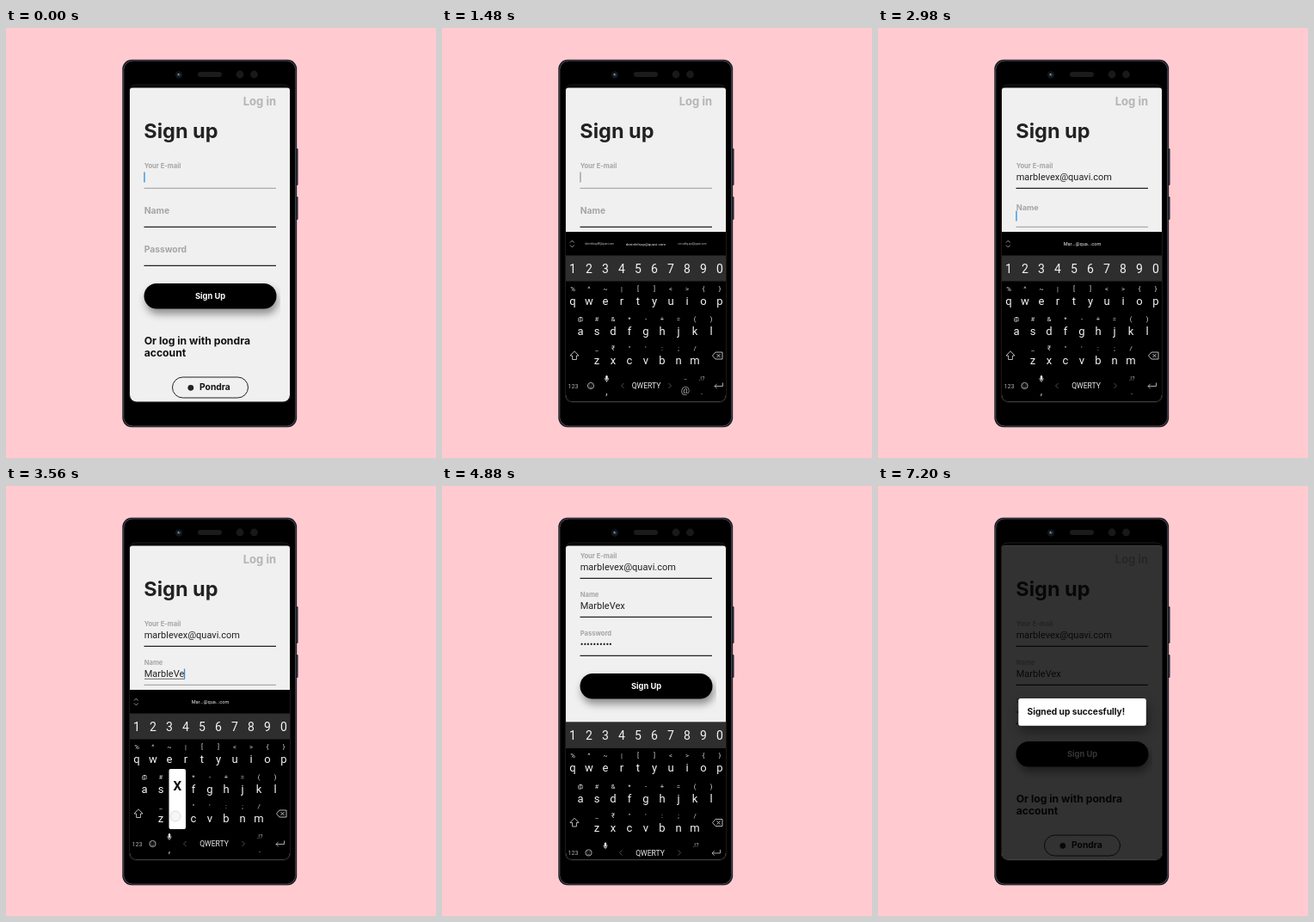
An HTML page with a canvas for the animation above (8.78 s loop, 500 px wide and 500 px high).

```html
<!DOCTYPE html>
<html lang="en">
<head>
<meta charset="utf-8">
<title>Sign up form</title>
<style>
  html, body { margin: 0; width: 100%; height: 100%; overflow: hidden; background: #ffcbd0; }
  canvas { display: block; width: 500px; height: 500px; }
</style>
</head>
<body>
<canvas id="stage"></canvas>
<script>
const LOOP = 8780;
const UI = 'Inter, sans-serif', KEY = 'Roboto, sans-serif';
const canvas = document.getElementById('stage');
const dpr = window.devicePixelRatio || 1;
canvas.width = canvas.height = 500 * dpr;
const c = canvas.getContext('2d');
c.scale(dpr, dpr);

const clamp = v => Math.min(1, Math.max(0, v));
const ease = (t, a, b) => { const p = clamp((t - a) / (b - a)); return p * p * (3 - 2 * p); };
const mix = (a, b, p) => a + (b - a) * p;

function text(str, x, y, size, color, { weight = 400, font = KEY, align = 'left' } = {}) {
  c.font = `${weight} ${size}px ${font}`;
  c.textAlign = align;
  c.fillStyle = color;
  c.fillText(str, x, y);
}
const bold = (str, x, y, size, color, align) =>
  text(str, x, y, size, color, { weight: 700, font: UI, align });
const mid = (str, x, y, size, color = '#eee') => text(str, x, y, size, color, { align: 'center' });

function rect(x, y, w, h, color) { c.fillStyle = color; c.fillRect(x, y, w, h); }
function round(x, y, w, h, r, fill, stroke) {
  c.beginPath();
  c.roundRect(x, y, w, h, r);
  if (fill) { c.fillStyle = fill; c.fill(); }
  if (stroke) { c.strokeStyle = stroke; c.lineWidth = 1; c.stroke(); }
}
function disc(x, y, r, fill, stroke) { round(x - r, y - r, 2 * r, 2 * r, r, fill, stroke); }
function path(color, width, ...points) {
  c.beginPath();
  points.forEach(([x, y], i) => i ? c.lineTo(x, y) : c.moveTo(x, y));
  c.strokeStyle = color;
  c.lineWidth = width;
  c.stroke();
}
function shadow(alpha, blur, dx, dy) {
  c.shadowColor = `rgba(0,0,0,${alpha})`;
  c.shadowBlur = blur * dpr;
  c.shadowOffsetX = dx * dpr;
  c.shadowOffsetY = dy * dpr;
}

// Each field types one character per step; focus is when it is tapped.
const FIELDS = [
  { label: 'Your E-mail', value: 'marblevex@quavi.com', focus: -1000, start: 1532, step: 72 },
  { label: 'Name', value: 'MarbleVex', focus: 2940, start: 3041, step: 63 },
  { label: 'Password', value: '0987654321', focus: 3930, start: 4060, step: 64, secret: true }
];
const COMMIT = 0.8;
const typed = (f, t) =>
  Math.max(0, Math.min(f.value.length, Math.floor((t - f.start) / f.step + 1 - COMMIT)));

const ROWS = [
  { keys: '1234567890', x: 152, y: 280 },
  { keys: 'qwertyuiop', x: 152, y: 317, alt: '%^~|[]<>{}' },
  { keys: 'asdfghjkl', x: 161, y: 352.5, alt: '@#&*-+=()' },
  { keys: 'zxcvbnm', x: 180, y: 386.5, alt: '_₹"\':;/' }
];
function keyPos(ch) {
  if (ch === '@') return [283, 422];
  if (ch === '.') return [302, 422];
  const row = ROWS.find(r => r.keys.includes(ch));
  return [row.x + 19 * row.keys.indexOf(ch), row.y];
}

function drawPhone() {
  round(336, 140, 3.6, 43, 1.2, '#2a2b38');
  round(336, 196, 3.6, 27, 1.2, '#2a2b38');
  round(135.3, 36.8, 202.9, 427.4, 11, '#16161f');
  round(136.8, 38, 199.9, 425, 10.5, '#000', '#50505c');
  round(143.4, 66, 187.2, 369, 7, null, '#1c1c1c');
  round(223, 51, 28, 6, 3, '#1b1b1d');
  disc(201, 54.5, 4.2, '#11151c');
  disc(201, 54.5, 1.8, '#39475a');
  disc(200.4, 53.8, 0.8, '#a9bccb');
  disc(272, 54, 4.4, '#19191b');
  disc(288.5, 54, 4.4, '#19191b');
}

function drawField(f, i, t, focused) {
  const y = 186 + 45 * i, up = ease(t, f.focus, f.focus + 90);
  bold(f.label, 160.7, mix(y - 14.7, y - 23.5, up), mix(10.3, 7.6, up), '#a5a5a5');
  path(focused ? '#999' : '#222', focused ? 1 : 1.3, [160.5, y + 0.3], [314, y + 0.3]);

  const n = typed(f, t);
  let shown = f.value.slice(0, n);
  if (f.secret && n) shown = t > 4760 ? '•'.repeat(n) : '•'.repeat(n - 1) + shown[n - 1];
  text(shown, 160.7, y - 8.7, 11, '#222');
  if (!focused) return;
  const w = c.measureText(shown).width;
  if (n && !f.secret) path('#444', 0.8, [161, y - 6.7], [161 + w, y - 6.7]);
  rect(160.3 + w, y - 18.5, 1.3, 12, t > 820 && t < 1520 ? '#999' : '#2b8fdc');
}

function drawPage(t, scroll, focus) {
  rect(144, 69, 187, 366, '#f0f0f0');
  c.save();
  c.translate(0, -scroll);
  bold('Log in', 314, 90, 13, '#b4b4b4', 'right');
  bold('Sign up', 160.3, 127.5, 23.5, '#222');
  FIELDS.forEach((f, i) => drawField(f, i, t, i === focus));

  c.save();
  c.beginPath();
  c.rect(144, 280, 175, 70);
  c.clip();
  shadow(0.42, 10, 2, 6);
  round(160.5, 297, 154, 29.5, 14.75, '#000');
  c.restore();
  bold('Sign Up', 237.5, 315, 9.3, '#fff', 'center');

  bold('Or log in with pondra', 160.7, 368.3, 12.2, '#111');
  bold('account', 160.7, 382, 12.2, '#111');
  round(193.5, 406, 88, 24, 12, null, '#222');
  disc(214.8, 418.3, 3.4, '#222');
  bold('Pondra', 225, 421.3, 10.3, '#111');
  c.restore();
}

function drawSuggestions(t) {
  path('#aaa', 0.9, [149, 249.5], [151.3, 247.2], [153.6, 249.5]);
  path('#aaa', 0.9, [149, 252.5], [151.3, 254.8], [153.6, 252.5]);
  if (t < 1560) {
    mid('dorinfelsop88@quavi.com', 183, 251.8, 2.9, '#ccc');
    mid('dorinfelsop@quavi.com', 237, 252.5, 4.4);
    mid('ren.solby.quil@quavi.com', 291, 251.8, 2.9, '#ccc');
  } else if (t > 2960) {
    mid('Mar...@qua...com', 237.5, 253, 5.6);
  }
}

function drawKeyboard(t, top) {
  const mail = t < 2960;
  rect(144, top, 187, 436 - top, '#000');
  c.save();
  if (t < 1000 || t > 4800) c.translate(0, top - (mail ? 237 : 264));
  if (t < 3900) drawSuggestions(t);
  rect(144, 264.5, 187, 30, '#2e2e2e');
  for (const { keys, x, y, alt } of ROWS) {
    [...keys].forEach((k, i) => {
      mid(k, x + 19 * i, y + 4.8, alt ? 13 : 14, '#f4f4f4');
      if (alt) mid(alt[i], x + 19 * i, y - 11.3, 7.8, '#ddd');
    });
  }

  path('#ccc', 0.9, [151.6, 385.5], [151.6, 381], [149, 381], [154, 375.7], [159, 381],
    [156.4, 381], [156.4, 385.5], [151.6, 385.5]);
  path('#ccc', 0.9, [314.5, 381], [318, 377], [326, 377], [326, 385], [318, 385], [314.5, 381]);
  path('#ccc', 0.9, [319.5, 379], [323.5, 383]);
  path('#ccc', 0.9, [323.5, 379], [319.5, 383]);

  mid('123', 152.5, 418.8, 7.2, '#aaa');
  const face = mail ? 173 : 170.5;
  disc(face, 416, 3.6, null, '#aaa');
  disc(face - 1.3, 415, 0.5, '#aaa');
  disc(face + 1.3, 415, 0.5, '#aaa');
  path('#aaa', 0.7, [face - 1.6, 417.2], [face, 418.2], [face + 1.6, 417.2]);

  const comma = mail ? 191.5 : 190;
  round(comma - 1.2, 404, 2.4, 5, 1.2, '#eee');
  path('#eee', 0.7, [comma - 2.2, 407], [comma - 1.3, 410], [comma + 1.3, 410], [comma + 2.2, 407]);
  path('#eee', 0.7, [comma, 410], [comma, 411.8]);
  mid(',', comma, 426, 12, '#ccc');

  const space = mail ? 237.5 : 242;
  const wing = mail ? 27.5 : 34;
  mid('QWERTY', space, 419.3, 8.6);
  path('#555', 0.9, [space - wing + 1.5, 413], [space - wing - 1.5, 416], [space - wing + 1.5, 419]);
  path('#555', 0.9, [space + wing - 1.5, 413], [space + wing + 1.5, 416], [space + wing - 1.5, 419]);
  if (mail) {
    mid('_', 283, 408, 7, '#aaa');
    mid('@', 283, 425, 11.5, '#aaa');
  }
  const dot = mail ? 302 : 295;
  mid('.!?', dot, 410, 7, '#aaa');
  mid('.', dot, 426, 10, '#aaa');
  const enter = mail ? 321.5 : 318.5;
  path('#bbb', 0.9, [enter + 5, 412.5], [enter + 5, 416.5], [enter - 4.5, 416.5]);
  path('#bbb', 0.9, [enter - 1.8, 413.8], [enter - 4.5, 416.5], [enter - 1.8, 419.2]);
  c.restore();
}

function drawTouch(x, y, alpha = 0.62) {
  disc(x, y, 6, `rgba(150,150,150,${alpha})`, `rgba(190,190,190,${alpha * 0.5})`);
}

function drawPress(t) {
  for (const f of FIELDS) {
    const beat = (t - f.start) / f.step, i = Math.floor(beat), part = beat - i;
    if (i < 0 || i >= f.value.length) continue;
    const ch = f.value[i].toLowerCase(), [x, y] = keyPos(ch);
    if (/[a-z]/.test(ch) && part > 0.2 && part < COMMIT) {
      round(x - 9.5, y - 57.5, 19.5, 70, 2, '#fff');
      text(ch, x + 0.3, y - 33, 20, '#111', { weight: 500, align: 'center' });
      disc(x - 2, y - 2.5, 6, '#f6f6f6', '#ddd');
    } else {
      drawTouch(x - 3.5, y - 4);
    }
  }
}

function drawTaps(t) {
  if (t >= 280 && t < 660) {
    const p = ease(t, 280, 640);
    drawTouch(mix(237, 190, p), mix(356, 174, p), 0.5);
  }
  if (t >= 2910 && t < 2980) drawTouch(205, 215);
  if (t >= 3640 && t < 3840) drawTouch(240, mix(210, 131, ease(t, 3640, 3820)));
  if (t >= 3900 && t < 3970) drawTouch(205, 180);
  if (t >= 5300 && t < 5400) drawTouch(237, 311);
}

function drawOverlays(t) {
  const shade = p => rect(144, 69, 187, 366, `rgba(0,0,0,${0.54 * p})`);
  if (t < 5420) return;
  shade(ease(t, 5420, 5580));

  const age = t - 5740;
  const from = (46 + age * 0.36) * Math.PI / 180;
  const sweep = (40 + 220 * Math.sin(Math.PI * age / 1333) ** 2) * Math.PI / 180;
  c.beginPath();
  c.arc(237.5, 263, 9.3, from, from + sweep);
  c.strokeStyle = '#fff';
  c.lineWidth = 2.5;
  if (t > 5520) c.stroke();

  const p = ease(t, 7000, 7200);
  if (!p) return;
  shade(p);
  c.save();
  c.globalAlpha = p;
  shadow(0.4, 14, 2, 7);
  round(163.3, 247, 148.5, 31.8, 2.5, '#fff');
  c.shadowColor = 'transparent';
  bold('Signed up succesfully!', 173.5, 265.7, 10.2, '#111');
  c.restore();
}

function draw(t) {
  rect(0, 0, 500, 500, '#ffcbd0');
  drawPhone();
  c.save();
  c.beginPath();
  c.roundRect(144, 69.5, 186, 365, [3, 3, 8, 8]);
  c.clip();

  const scroll = 79 * (ease(t, 3640, 3860) - ease(t, 4880, 5020));
  const focus = t > 4860 ? -1 : FIELDS.findLastIndex(f => t >= f.focus);
  drawPage(t, scroll, focus);
  if (t >= 820 && t < 5020) {
    const open = t < 3900 ? 237 : 264;
    drawKeyboard(t, mix(436, open, ease(t, 810, 920) - ease(t, 4860, 5000)));
  }
  drawPress(t);
  drawTaps(t);
  drawOverlays(t);
  c.restore();
}

const begin = performance.now();
function tick() {
  draw((performance.now() - begin) % LOOP);
  requestAnimationFrame(tick);
}
tick();
</script>
</body>
</html>
```
